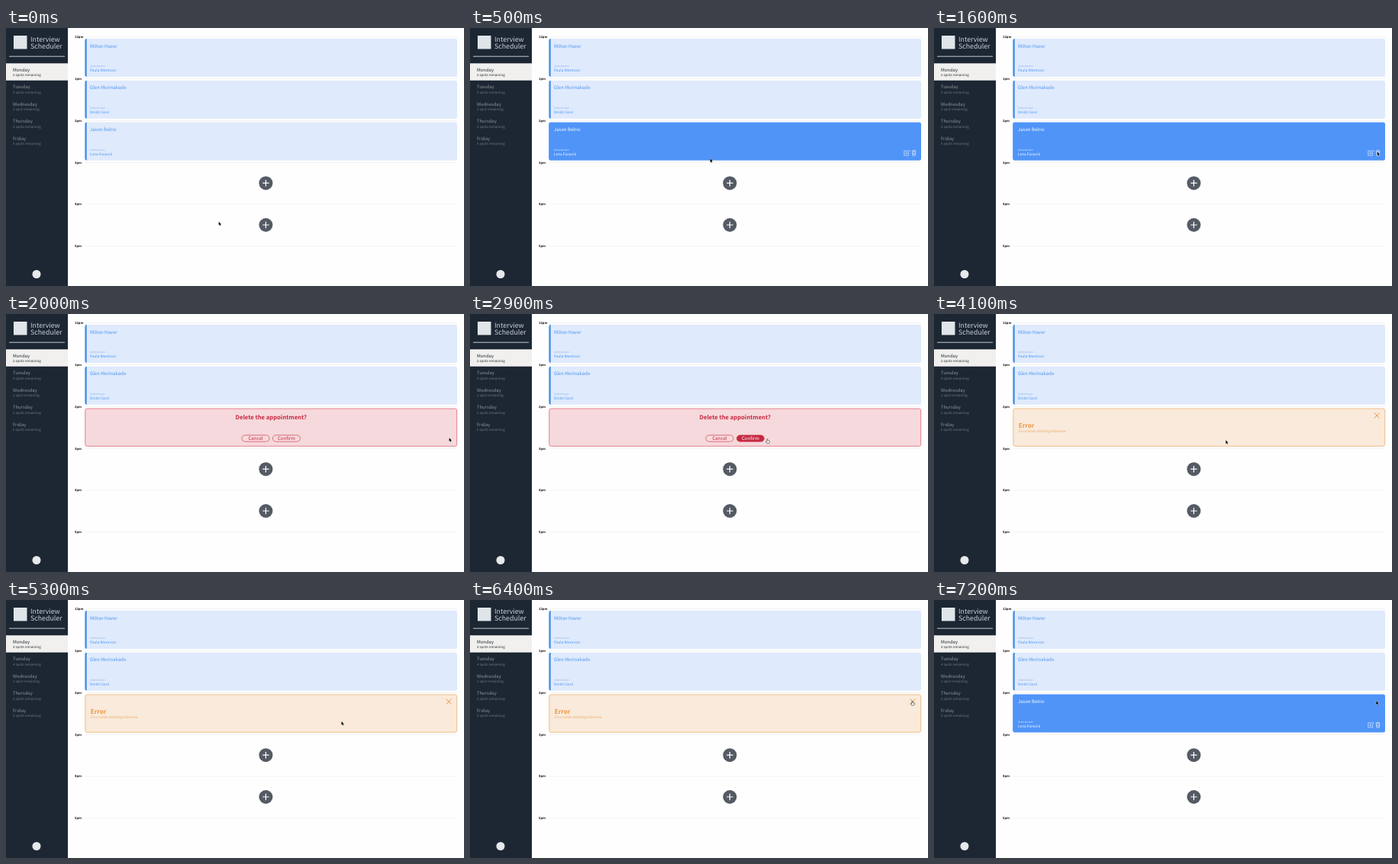
Recreate the animation shown at these times as an HTML page. Size 600 by 338 pixels, loop 7400 ms.

```html
<!DOCTYPE html>
<html lang="en">
<head>
<meta charset="utf-8">
<title>Interview Scheduler</title>
<style>
  html, body { margin: 0; width: 100%; height: 100%; overflow: hidden; background: #fefefe; }
  svg { display: block; width: 100vw; height: 100vh; }
  text {
    font-family: "Noto Sans CJK JP", "Noto Sans CJK SC", "Noto Sans CJK", "Open Sans", sans-serif;
    text-rendering: geometricPrecision;
  }
  .title { font-size: 8.8px; font-weight: 300; fill: #c9d0d6; }
  .day { font-size: 5.9px; fill: #8d949c; }
  .spots { font-size: 4.45px; fill: #727a83; }
  .selected .day, .selected .spots { fill: #25292d; }
  .hour { font-size: 4.1px; font-weight: 700; fill: #111; }
  .card { fill: #dfeafc; }
  .bar { fill: #4a90e2; }
  .name { font-size: 6px; fill: #4a93ee; }
  .label { font-size: 3.76px; fill: #8cb8f3; }
  .person { font-size: 4.75px; fill: #4a93ee; }
  .hover .card, .hover .bar { fill: #5094f8; }
  .hover text { fill: #fff; }
  .hover .label { fill: #cfe1fd; }
  .icons { fill: none; stroke: #d5e5fe; stroke-width: .75; display: none; }
  .hover .icons { display: inline; }
  .bold { font-weight: 700; }
  .middle { text-anchor: middle; }
  .button rect { fill: none; stroke: #d0445a; stroke-width: .7; }
  .button text { font-size: 6.1px; fill: #c5283f; }
  .button.active rect { fill: #c5283f; }
  .button.active text { fill: #fff; }
</style>
</head>
<body>
<svg id="stage" viewBox="0 0 600 338" preserveAspectRatio="none"></svg>
<script>
const LOOP = 7400, STEP = 100, ROW = 54.8;
const stage = document.getElementById("stage");

const text = (x, y, cls, str, extra = "") =>
  `<text x="${x}" y="${y}" class="${cls}" ${extra}>${str}</text>`;

const panel = (fill, stroke = fill) =>
  `<rect x="103.8" y="124" width="486.9" height="49.2" rx="2.5" fill="${fill}" stroke="${stroke}" stroke-width=".8"/>`;

const dayItem = ([day, spots], i) => `
  <g transform="translate(0 ${i * 22.5})" class="${i ? "" : "selected"}">
    ${i ? "" : '<rect y="46.3" width="81" height="22.4" fill="#f1f0ef"/>'}
    ${text(9, 56.7, "day", day)}${text(9, 63.2, "spots", spots + " remaining")}
  </g>`;

const hourRow = (label, i) => {
  const y = 11.8 + i * ROW;
  return `<path d="M104 ${y}H591" stroke="#eee" stroke-width=".7"/>` + text(90, y + 1.4, "hour", label);
};

const booking = ([name, person], i) => `
  <g id="booking${i}" transform="translate(0 ${i * ROW})">
    <rect class="card" x="103.4" y="14" width="487.6" height="49.9" rx="2.5"/>
    <path class="bar" d="M105.8 14V63.9Q103.4 63.9 103.4 61.5V16.4Q103.4 14 105.8 14Z"/>
    ${text(110, 25.6, "name", name)}
    ${text(110, 51.2, "label", "Interviewer")}
    ${text(110, 57.2, "person", person)}
    <g class="icons">
      <path d="M572.5 51.3H568.8V57.4H574.6V54.2M571 55.2L571.4 53.4L574.6 50.4L575.9 51.7L572.8 54.8Z"/>
      <path d="M578.6 51.8H584.4M580.4 51.6V50.5H582.6V51.6M579.3 52L579.7 57.5H583.3L583.7 52M580.8 53.4V56.2M582.2 53.4V56.2"/>
    </g>
  </g>`;

const addButton = y => `
  <circle cx="340.4" cy="${y}" r="9" fill="#555b64"/>
  <path d="M336.2 ${y}h8.4m-4.2 -4.2v8.4" stroke="#fff" stroke-width="1.2"/>`;

const button = (id, x, label) => `
  <g id="${id}" class="button">
    <rect x="${x}" y="158.7" width="36" height="8.5" rx="4.25"/>
    ${text(x + 18, 165.1, "middle", label)}
  </g>`;

const days = [["Monday", "2 spots"], ["Tuesday", "4 spots"], ["Wednesday", "1 spot"],
  ["Thursday", "2 spots"], ["Friday", "5 spots"]];
const bookings = [["Milton Haver", "Paula Wexmoor"], ["Glen Morinakado", "Dmitri Sool"],
  ["Jason Belrio", "Lena Farwick"]];

stage.innerHTML = `
  <rect width="600" height="338" fill="#fefefe"/>
  <rect width="81" height="338" fill="#1d2733"/>
  <rect x="10" y="10" width="17.5" height="17.5" fill="#dfe5e9"/>
  ${text(32, 18.4, "title", "Interview")}${text(32, 26.6, "title", "Scheduler")}
  <path d="M4 37.2H77" stroke="#d3dde2" stroke-width=".9"/>
  ${days.map(dayItem).join("")}
  <circle cx="40" cy="322.5" r="5.5" fill="#e6e8ea"/>
  ${["12pm", "1pm", "2pm", "3pm", "4pm", "5pm"].map(hourRow).join("")}
  ${bookings.map(booking).join("")}
  ${addButton(203.2)}${addButton(258)}
  <g id="confirm">
    ${panel("#f6d9dc", "#df6575")}
    ${text(347.2, 137.5, "bold middle", "Delete the appointment?", 'font-size="7.65" fill="#c5283f"')}
    ${button("cancelButton", 309, "Cancel")}${button("confirmButton", 349.4, "Confirm")}
  </g>
  <g id="deleting">
    ${panel("#1d2733")}
    <g id="spinner" fill="none" stroke="#fff" stroke-width="1.1">
      <circle r="6.2" stroke-opacity=".15"/>
      <path d="M0 -6.2A6.2 6.2 0 0 1 0 6.2"/>
      <path d="M0 6.2A6.2 6.2 0 0 1 -5.4 3.1" stroke-opacity=".55"/>
    </g>
    ${text(338.3, 151.2, "bold", "Deleting...", 'font-size="7.95" fill="#fff"')}
  </g>
  <g id="error">
    ${panel("#f9eadb", "#eab06c")}
    ${text(110.8, 148.6, "bold", "Error", 'font-size="8.1" fill="#ec9645"')}
    ${text(110.8, 155.3, "", "Error while deleting interview", 'font-size="4.5" fill="#f0a862"')}
    <path d="M576.6 129.6L583.6 136.6M583.6 129.6L576.6 136.6" stroke="#ec9645" stroke-width="1"/>
  </g>
  <g id="cursor" stroke-linejoin="round">
    <path id="arrow" d="M0 0V4.8L1.1 3.8L1.9 5.5L2.7 5.1L1.9 3.5H3.4Z" fill="#000" stroke="#fff" stroke-width=".6" paint-order="stroke"/>
    <path id="hand" d="M-.5 .3Q0 -.4 .5 .3V2.1L2.6 2.7Q3 3 2.8 4.2L2.2 5.8H-.7L-2.1 3.6Q-1.9 2.9 -.5 3.8Z" fill="#fff" stroke="#222" stroke-width=".55"/>
  </g>`;

const el = id => document.getElementById(id);
const show = (id, on) => el(id).style.display = on ? "" : "none";
const within = (t, from, to) => t >= from && t < to;

const ease = {
  inOut: p => p * p * (3 - 2 * p),
  in: p => p * p,
  out: p => p * (2 - p)
};

// Each move: start, end, target x, target y, easing
const moves = [
  [0, 600, 317.5, 164.5, ease.inOut],
  [700, 1500, 580.6, 162.2, ease.inOut],
  [2200, 3000, 381, 163.6, ease.inOut],
  [3800, 4100, 382.2, 165.2, ease.inOut],
  [4600, 5400, 457, 157, ease.in],
  [5400, 6200, 579.3, 132.2, ease.out]
];

function cursorAt(t) {
  let x = 278.7, y = 253.8;
  for (const [start, end, toX, toY, curve] of moves) {
    const p = curve(Math.min(1, Math.max(0, (t - start) / (end - start))));
    x += (toX - x) * p;
    y += (toY - y) * p;
  }
  return [x, y];
}

function draw(now) {
  const t = Math.floor(now % LOOP / STEP) * STEP;
  const [x, y] = cursorAt(t);
  const onConfirm = within(t, 2800, 3100), onClose = within(t, 6300, 6700);

  el("booking2").setAttribute("class", t >= 500 ? "hover" : "");
  show("booking2", !within(t, 2000, 6700));
  show("confirm", within(t, 2000, 3100));
  show("deleting", within(t, 3100, 3900));
  show("error", within(t, 3900, 6700));
  el("confirmButton").classList.toggle("active", onConfirm);
  el("spinner").setAttribute("transform", `translate(322.4 148.4) rotate(${(t - 3100) * .36})`);

  show("hand", onConfirm || onClose);
  show("arrow", !onConfirm && !onClose);
  el("cursor").setAttribute("transform", `translate(${x} ${y})`);
  requestAnimationFrame(draw);
}
draw(performance.now());
</script>
</body>
</html>
```
